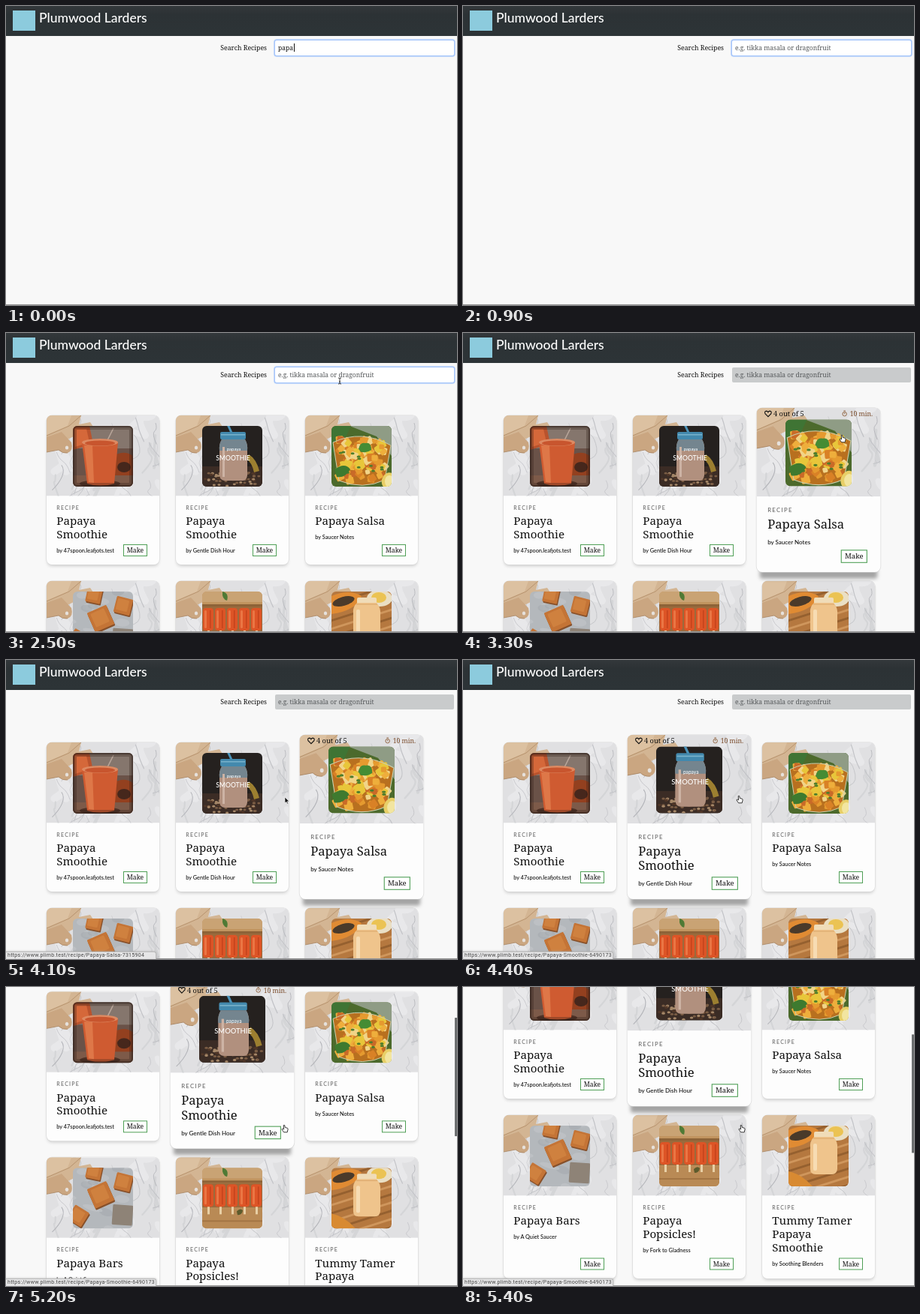
Write an HTML page that moves like this. It is 600 px wide and 399 px high and loops after 5.5 s.

```html
<!DOCTYPE html>
<html lang="en">
<head>
<meta charset="utf-8">
<title>Recipe search</title>
<style>
html, body { margin: 0; width: 100%; height: 100%; overflow: hidden; background: #f8f8f8; }
#stage { position: relative; width: 600px; height: 399px; overflow: hidden; background: #f8f8f8; color: #111; }
#stage div, #stage svg { position: absolute; }
#page { left: 0; top: 0; width: 600px; height: 1007px; }
#head { left: 0; top: 0; width: 600px; height: 40px; background: linear-gradient(#33383b, #2c3235 30%, #2d3437); }
#logo { left: 9px; top: 6px; width: 30px; height: 27px; background: #8ccbdd; }
#brand { left: 44px; top: 5px; font: 500 17.5px/22px Lato, sans-serif; color: #fff; white-space: nowrap; }
#label, #field { font-family: "Noto Serif", serif; font-weight: 500; white-space: pre; }
#label { right: 253px; top: 49px; font-size: 8.7px; line-height: 15px; }
#field { left: 358px; top: 45.5px; width: 234px; height: 20.5px; padding-left: 4px; border-radius: 2px;
  font-size: 8.5px; line-height: 19.5px; background: #c9cbcc; color: #55585a; }
#field.focus { background: #fff; box-shadow: 0 0 0 1.5px #a5c5fa, 0 0 2px 1px #a5c5fa; }
#field.typed { color: #111; }
#caret { display: inline-block; width: 1px; height: 11px; margin-left: .5px; vertical-align: -2px; background: #111; }
.card { width: 150px; border-radius: 7px; overflow: hidden; background: #fdfdfd; }
.card svg { left: 0; top: 0; }
.slab { font-family: "Noto Serif", serif; font-weight: 500; fill: #111; }
.sans { font-family: Lato, sans-serif; font-weight: 500; fill: #111; }
#url { left: 0; top: 389px; width: 200px; height: 10px; box-sizing: border-box; padding-left: 2px; background: #e6e6e7;
  border: solid #bbb; border-width: 1px 1px 0 0; border-radius: 0 3px 0 0; box-shadow: 0 0 3px #aaa;
  font: 7px/9px Roboto, sans-serif; letter-spacing: .3px; color: #444; white-space: nowrap; }
#bar { right: 0; top: 0; width: 3px; height: 158px; background: #6d6f70; }
#edge { left: 0; top: 398px; width: 600px; height: 1px; background: #999; }
#cursor { left: 0; top: 0; overflow: visible; }
</style>
</head>
<body>
<div id="stage">
  <div id="page">
    <div id="head"><div id="logo"></div><div id="brand">Plumwood Larders</div></div>
    <div id="label">Search Recipes</div>
    <div id="field"><span id="value"></span><span id="caret"></span></div>
    <div id="cards"></div>
  </div>
  <div id="bar"></div>
  <div id="edge"></div>
  <div id="url"></div>
  <svg id="cursor" width="1" height="1">
    <path id="beam" d="M-2 -4Q0 -4 0 -3Q0 -4 2 -4M0 -3V3M-2 4Q0 4 0 3Q0 4 2 4M-1 1H1" fill="none" stroke="#222" stroke-width=".9"/>
    <path id="arrow" d="M0 0V8L1.9 6.3L3.1 9L4.4 8.4L3.2 5.8H5.7Z" fill="#111" stroke="#fff" stroke-width=".6"/>
    <path id="hand" d="M-1.8 -4.4Q-.9 -5.4 -.2 -4.3L.3 -1.5L3.2 -.8Q4.3 -.5 4.1 .9L3.2 4.8H-1.4L-4 1Q-4 -.2 -2.6 .2L-1.4 1Z"
      fill="#fff" stroke="#222" stroke-width=".9"/>
  </svg>
</div>
<script>
const LOOP = 5500, STEP = 100;
const $ = id => document.getElementById(id);

let seed = 7;
const rnd = (a, b) => {
  seed = (seed * 16807) % 2147483647;
  return a + (b - a) * seed / 2147483647;
};
const pick = list => list[Math.floor(rnd(0, list.length))];
const many = (n, f) => Array.from({ length: n }, (_, i) => f(i)).join('');
const rect = (x, y, w, h, fill, more = '') => `<rect x="${x}" y="${y}" width="${w}" height="${h}" fill="${fill}" ${more}/>`;
const oval = (x, y, rx, ry, fill, more = '') => `<ellipse cx="${x}" cy="${y}" rx="${rx}" ry="${ry}" fill="${fill}" ${more}/>`;
const path = (d, fill, more = '') => `<path d="${d}" fill="${fill}" ${more}/>`;
const line = (d, color, w) => path(d, 'none', `stroke="${color}" stroke-width="${w}"`);
const text = (x, y, size, cls, str, more = '') => `<text x="${x}" y="${y}" font-size="${size}" class="${cls}" ${more}>${str}</text>`;
const turn = (x, y, s, a, fill) => rect(-s / 2, -s / 2, s, s, fill, `rx="1.5" transform="translate(${x} ${y}) rotate(${a})"`);

// Each dish is drawn in an 80 x 81 box.
const dishes = {
  glass: () => rect(0, 0, 80, 81, '#6a5248') + rect(0, 0, 80, 30, '#85766d') +
    path('M0 0H22L27 24L0 32Z', '#b9532d') + path('M3 4H18L22 22L3 28Z', '#d5683a') +
    path('M50 43Q66 30 80 40V72H52Z', '#93401f') + oval(68, 55, 9, 7, '#46271c') +
    rect(0, 66, 80, 15, '#7d5a49') + oval(36, 77, 27, 5, '#4f3226') +
    line('M44 23L54 3', '#b9a79b', 1.5) +
    path('M12 22H60L55 77Q36 83 19 77Z', '#cf5b31') + path('M15 26H26L28 76L21 75Z', '#de7748') +
    oval(36, 22, 24, 5, '#dd8a62') + oval(36, 23, 20, 3.5, '#c8552e') +
    rect(0, 0, 80, 81, 'none', 'rx="6" stroke="#2b1c16" stroke-opacity=".3" stroke-width="10"') +
    rect(0, 0, 80, 81, 'none', 'rx="6" stroke="#2b1c16" stroke-opacity=".5" stroke-width="4"'),
  shake: () => rect(0, 0, 80, 81, '#25211f') + rect(0, 54, 80, 27, '#3b2c25') +
    path('M62 38Q72 44 76 60L69 62Q66 48 58 44Z', '#9c7f30') +
    many(70, () => oval(rnd(2, 78), rnd(62, 80), 2, 1.4, pick(['#a58768', '#503627', '#7a5c44']))) +
    line('M39 9L34 -2', '#4b93ba', 3) +
    rect(24, 8, 34, 10, '#4389ad', 'rx="2"') + rect(25, 11, 32, 1.5, '#79b2cb') +
    path('M26 18H57Q61 25 60 33V66Q59 73 54 73H30Q24 73 23 66V33Q22 25 26 18Z', '#b1907e') +
    path('M26 18H57Q61 25 60 33H23Q22 25 26 18Z', '#74858f') + rect(27, 28, 3, 40, '#cdb3a4') +
    text(42, 33, 6, 'sans', 'papaya', 'text-anchor="middle" style="fill:#fff"') +
    text(41, 46, 8.6, 'sans', 'SMOOTHIE', 'text-anchor="middle" style="fill:#fff"'),
  salsa: () => rect(0, 0, 80, 81, '#4c6a2c') + path('M24 0H80V40L60 14Z', '#8f9c85') +
    path('M0 0H26L12 30L0 36Z', '#3f7434') + path('M2 22Q40 4 79 26L71 72Q42 86 10 73Z', '#b8701f') +
    many(95, () => turn(rnd(9, 71), rnd(18, 73), rnd(6, 11), rnd(0, 90),
      pick(['#e8c63a', '#eeae3c', '#d98126', '#f1d488', '#c96a28', '#e59a2f']))) +
    many(12, () => oval(rnd(12, 68), rnd(24, 70), 2.5, 1.5, '#4e7d2c')) +
    line('M2 22Q40 4 79 26L71 72Q42 86 10 73Z', '#c9cfae', 1) +
    path('M36 31Q38 21 45 23Q53 21 53 32Q43 39 36 31Z', '#458c34') +
    path('M4 58Q18 48 25 58Q18 70 7 68Z', '#3e7a2f') +
    oval(76, 73, 9, 11, '#e8cf67', 'transform="rotate(20 76 73)"') + oval(77, 74, 6, 8, '#f2e5a0'),
  bars: () => rect(0, 0, 80, 81, '#b4b8bc') +
    many(14, () => oval(rnd(0, 80), rnd(0, 80), rnd(6, 14), rnd(3, 6), pick(['#c3c7ca', '#a5abb0']),
      `transform="rotate(${rnd(-20, 20)})" opacity=".6"`)) +
    [[28, 5, 20, 12], [67, 19, 22, 14], [37, 36, 28, -24], [7, 64, 22, 32]].map(([x, y, s, a]) =>
      turn(x + 1, y + 2, s, a, '#87502a') + turn(x, y, s, a, '#c47436') + turn(x - 1, y - 1, s * .7, a, '#cf813f')).join('') +
    turn(66, 63, 27, 4, '#8e8377'),
  pops: () => rect(0, 0, 80, 81, '#c1945f') + rect(0, 0, 80, 14, '#c9a374') + rect(0, 17, 80, 3, '#8d6338') +
    rect(0, 20, 80, 33, '#9a6a3c') + rect(0, 54, 80, 27, '#b98a55') + rect(0, 70, 80, 2, '#a37544') +
    path('M27 0Q36 2 33 12Q26 10 27 0Z', '#4f7a35') +
    many(5, i => rect(7 + i * 16, 50, 3, 12, '#e8cfa5') +
      rect(1 + i * 16, 22, 14, 30, '#dd5426', 'rx="4"') + rect(3 + i * 16, 25, 3, 24, '#ea7644', 'rx="1.5"') +
      rect(10 + i * 16, 25, 1.5, 24, '#c4431c')) +
    path('M46 58Q51 53 54 57Q53 63 47 63Z', '#5c5b2c'),
  jar: () => rect(0, 0, 80, 81, '#b5783f') +
    many(9, i => line(`M-4 ${i * 11 + 18}L84 ${i * 11 - 10}`, i % 2 ? '#cf965c' : '#95602f', 3)) +
    path('M0 6Q24 -4 40 6Q32 26 0 30Z', '#e08b33') + oval(16, 13, 15, 6, '#4a3a2a', 'transform="rotate(-15 16 13)"') +
    oval(64, 9, 17, 11, '#eadfc4') + oval(63, 8, 10, 7, '#ebc353') + path('M0 61Q18 65 32 81H0Z', '#d88a32') +
    rect(34, 8, 26, 9, '#f0dcb8', 'rx="2"') +
    path('M34 15H60Q66 22 65 30V58Q64 65 58 65H36Q29 65 29 58V29Q28 21 34 15Z', '#efc48c') +
    rect(33, 24, 5, 36, '#f7dcb3', 'rx="2"') + line('M33 17H61', '#d9a568', 1),
};

// Marble top with wooden boards, same on every card.
const counter = () => {
  seed = 41;
  const vein = (color, min, max) => {
    const x = rnd(10, 150), y = rnd(-10, 100);
    return line(`M${x} ${y}q${rnd(-2, 6)} ${rnd(4, 12)} ${rnd(-14, 12)} ${rnd(8, 18)}t${rnd(-16, 10)} ${rnd(10, 26)}`, color, rnd(min, max));
  };
  return rect(0, 0, 150, 107.5, '#e0e0e2') +
    `<g stroke-linecap="round" opacity=".7">${many(12, () => vein('#ececee', 5, 12))}${many(12, () => vein('#cfd0d3', 2, 5))}</g>` +
    many(26, () => vein(pick(['#b4b5ba', '#c2c3c7']), .4, 1.2)) +
    path('M0 0H46L43 12L58 9L62 15L36 28L0 46Z', '#d3b593') + path('M0 0H33L28 14L0 26Z', '#dcc1a1') +
    path('M0 29L20 22L33 36Q36 47 28 50Q21 51 16 46L0 49Z', '#caa681') +
    line('M0 27L30 14L46 0', '#b08b65', .8) + line('M0 49L16 46Q21 51 28 50', '#a88562', .8) +
    oval(27, 43, 2.2, 2.6, '#e6e1dc');
};

const recipes = [
  ['glass', '47spoon.leafjots.test', 'Papaya', 'Smoothie'],
  ['shake', 'Gentle Dish Hour', 'Papaya', 'Smoothie'],
  ['salsa', 'Saucer Notes', 'Papaya Salsa'],
  ['bars', 'A Quiet Saucer', 'Papaya Bars'],
  ['pops', 'Fork to Gladness', 'Papaya', 'Popsicles!'],
  ['jar', 'Soothing Blenders', 'Tummy Tamer', 'Papaya', 'Smoothie'],
];

const badge = `<g class="badge">
  ${path('M14 10.6L10.4 6.9Q9.3 3.9 12 3.7Q13.3 3.7 14 5.1Q14.7 3.7 16 3.7Q18.7 3.9 17.6 6.9Z', 'none', 'stroke="#111"')}
  ${text(20.5, 10.3, 8.4, 'slab', '4 out of 5')}
  ${oval(106.5, 7.3, 2.5, 2.5, 'none', 'stroke="#8a5a35" stroke-width=".8"')}
  ${line('M105.3 3.5H107.7M106.5 5.8V7.5', '#8a5a35', .8)}
  ${text(113, 10.3, 7.8, 'slab', '10 min.', 'style="fill:#7a4b2a"')}</g>`;

const cards = recipes.map(([dish, by, ...title], i) => {
  const row = Math.floor(i / 3), h = row ? 217.5 : 199;
  const el = document.createElement('div');
  el.className = 'card';
  el.style.cssText = `left:${53.7 + i % 3 * 172}px;top:${row ? 331 : 109.5}px;height:${h}px`;
  el.innerHTML = `<svg width="150" height="${h}">
    <clipPath id="top${i}">${rect(0, 0, 150, 107.5, '#000')}</clipPath>
    <clipPath id="dish${i}">${rect(0, 0, 80, 81, '#000', 'rx="6"')}</clipPath>
    <g clip-path="url(#top${i})">${counter()}</g>
    <g transform="translate(35 14)"><g clip-path="url(#dish${i})">${dishes[dish]()}</g></g>
    ${text(13.3, 126, 7, 'sans', 'RECIPE', 'letter-spacing="1.25" style="fill:#666"')}
    ${title.map((s, n) => text(13.3, 146.2 + n * 17.7, 15.1, 'slab', s)).join('')}
    ${text(13.3, 147.5 + title.length * 17.7, 7.3, 'sans', 'by ' + by)}
    ${rect(102.5, h - 26.5, 31, 15, '#fff', 'stroke="#4f9f56"')}
    ${text(118, h - 16, 8.6, 'slab', 'Make', 'text-anchor="middle"')}${badge}</svg>`;
  $('cards').append(el);
  return { el, badge: el.querySelector('.badge') };
});

// Pointer: time, x, y
const trail = [
  [2300, 437, 58], [2500, 444, 64], [2700, 470, 88], [2900, 497, 126], [3300, 505, 141],
  [3700, 499, 152], [3900, 440, 174], [4100, 371, 183], [4500, 367, 187], [4900, 371, 189],
];
const ease = (t, from, to) => {
  const p = Math.min(1, Math.max(0, (t - from) / (to - from)));
  return p * p * (3 - 2 * p);
};
const at = (t, table) => {
  const i = table.findIndex(k => k[0] > t);
  if (i < 1) return table[i < 0 ? table.length - 1 : 0].slice(1);
  const [a, b] = [table[i - 1], table[i]], p = (t - a[0]) / (b[0] - a[0]);
  return [a[1] + (b[1] - a[1]) * p, a[2] + (b[2] - a[2]) * p];
};
const last = (t, table) => table.filter(k => k[0] <= t).pop()[1];
const show = (el, on) => el.style.visibility = on ? 'visible' : 'hidden';

const typed = [[0, 'papa'], [200, 'papay'], [400, 'papaya'], [900, '']];
const links = [[0, ''], [3500, 'Salsa-7315904'], [4400, 'Smoothie-6490173']];
const shapes = [[0, ''], [2300, 'beam'], [2700, 'arrow'], [2900, 'hand'], [3900, 'arrow'], [4300, 'hand']];

function lift({ el, badge }, k) {
  el.style.transform = `scale(${1 + k * .1})`;
  el.style.zIndex = k > 0 ? 1 : 0;
  el.style.boxShadow = `0 0 0 .6px #d8d8d8, 0 ${3 + 9 * k}px ${4 + k}px ${-1 - 3 * k}px rgba(0,0,0,${.18 + .16 * k})`;
  badge.style.opacity = k;
}

function draw(t) {
  const word = last(t, typed);
  $('value').textContent = word || 'e.g. tikka masala or dragonfruit';
  $('caret').style.display = word ? 'inline-block' : 'none';
  $('field').className = (t < 2800 ? 'focus ' : '') + (word ? 'typed' : '');

  $('cards').style.display = t < 1300 ? 'none' : 'block';
  const leave = ease(t, 4100, 4400);
  const hover = [0, leave, ease(t, 2900, 3200) - leave, 0, 0, 0];
  cards.forEach((c, i) => lift(c, hover[i]));

  const scroll = 160 * ease(t, 4900, 5400);
  $('page').style.transform = `translateY(${-scroll}px)`;
  $('bar').style.transform = `translateY(${scroll * .396}px)`;
  show($('bar'), scroll > 0);

  const link = last(t, links);
  show($('url'), link);
  $('url').textContent = 'https://www.plimb.test/recipe/Papaya-' + link;

  const shape = last(t, shapes), [x, y] = at(t, trail);
  $('cursor').style.transform = `translate(${x}px, ${y}px)`;
  for (const id of ['beam', 'arrow', 'hand']) show($(id), id === shape);
}

const start = performance.now();
function tick() {
  const t = (performance.now() - start) % LOOP;
  draw(Math.floor(t / STEP) * STEP);
  requestAnimationFrame(tick);
}
tick();
</script>
</body>
</html>
```
